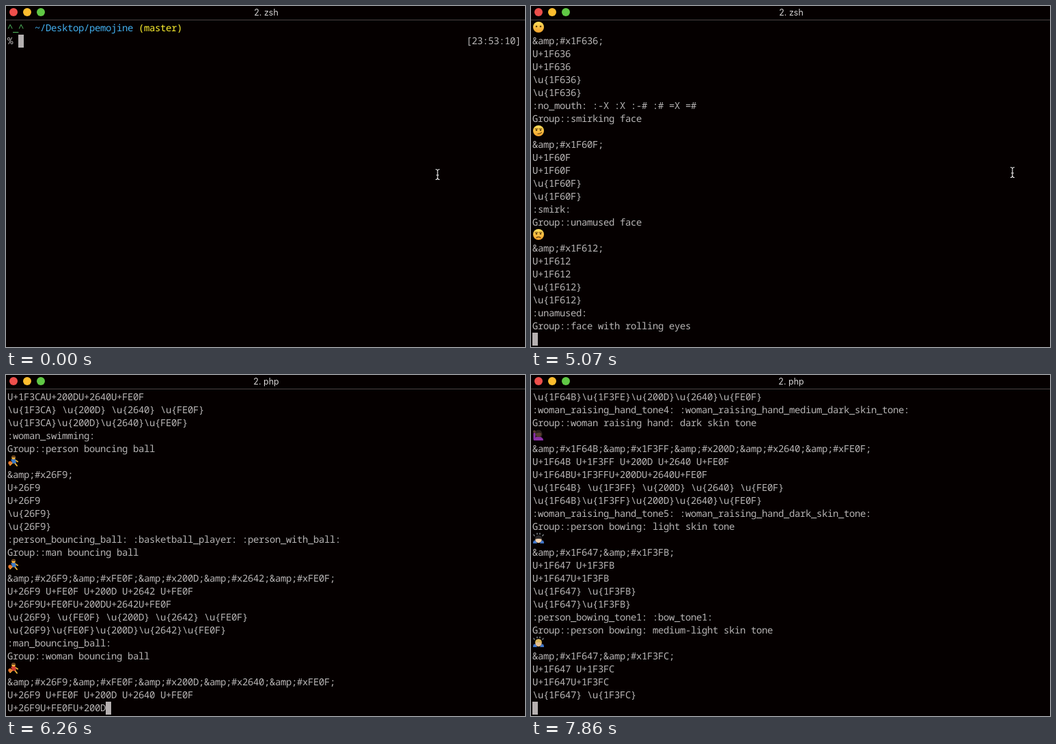
An HTML page that plays this animation: 760 px wide and 500 px high, repeating every 8000 ms.

```html
<!DOCTYPE html>
<html lang="en">
<head>
<meta charset="utf-8">
<title>Terminal</title>
<style>
html, body { margin: 0; width: 100%; height: 100%; overflow: hidden; background: #050000; }
svg { display: block; width: 760px; height: 500px; }
.mono { font: 500 14px "Noto Sans Mono", monospace; letter-spacing: -.4px; white-space: pre; text-rendering: geometricPrecision; }
.title { font: 400 12.5px Inter, sans-serif; text-anchor: middle; }
</style>
</head>
<body>
<svg viewBox="0 0 760 500" xmlns="http://www.w3.org/2000/svg">
  <defs>
    <linearGradient id="skin" x2="0" y2="1">
      <stop offset="0" stop-color="#ffe05c"/><stop offset="1" stop-color="#f3a02c"/>
    </linearGradient>
    <clipPath id="wave"><path d="M-8 -4Q-5 -6 -1 -4.5T8 -6V4Q4 6 0 4.5T-8 6Z"/></clipPath>
  </defs>
  <rect width="760" height="500" fill="#050000"/>
  <rect y="20" width="760" height="1" fill="#484444"/>
  <circle cx="11" cy="9" r="6" fill="#ee4f4b"/>
  <circle cx="31" cy="9" r="6" fill="#fdbd2e"/>
  <circle cx="51" cy="9" r="6" fill="#60c845"/>
  <text id="title" class="title" x="381" y="14" fill="#d2d0d0"></text>
  <g id="rows" class="mono" fill="#b8b5b5"></g>
  <g id="art"></g>
  <rect id="caret" width="8" height="19" fill="#b5b0b0"/>
  <path id="beam" d="M-3 -7.5Q0 -7.5 0 -5V5Q0 7.5 -3 7.5M3 -7.5Q0 -7.5 0 -5M0 5Q0 7.5 3 7.5M-2 1H2" fill="none" stroke="#e6e4e4" stroke-width="1.2"/>
</svg>
<script>
const LOOP = 8000, ROWS = 25, LINE = 19, COL = 8, LEFT = 2, TOP = 23;
const $ = id => document.getElementById(id);
const hex = n => n.toString(16).toUpperCase();

// Small pictures, each drawn around 0,0 in a box of about 16 px
const shape = (d, fill) => `<path d="${d}" fill="${fill}"/>`;
const disc = (fill, r = 7, x = 0, y = 0) => `<circle cx="${x}" cy="${y}" r="${r}" fill="${fill}"/>`;
const line = (d, color = '#60400f', w = 1.2) =>
  `<path d="${d}" fill="none" stroke="${color}" stroke-width="${w}" stroke-linecap="round"/>`;
const SKIN = 'url(#skin)', BROWN = '#6a4420', DARK = '#25222a';

const face = (mouth, brows = '') => disc(SKIN, 8) + disc('#60400f', 1.3, -3, -1) +
  disc('#60400f', 1.3, 3, -1) + line(mouth) + line(brows);
const cat = mouth => shape('M-7 -1L-6.5 -8L-1 -6ZM7 -1L6.5 -8L1 -6Z', '#f3a02c') + face(mouth);

function person({ skin = SKIN, hair = BROWN, cloth = '#4b8fd0', hat, long, extra = '' }) {
  return (long ? `<ellipse cy="-1" rx="5.6" ry="6" fill="${hair}"/>` : '') +
    shape('M-7 8Q-7 2.5 0 2.5T7 8Z', cloth) + disc(skin, 4.3, 0, -1.5) +
    shape('M-4.8 -2Q-5 -7.5 0 -7.5T4.8 -2Q2 -5 -4.8 -2Z', hair) +
    (hat ? shape('M-7 -4Q-5 -9 1 -8Q7 -8 6.5 -4Z', hat) : '') + extra;
}
const artist = long => person({ long, hat: DARK, cloth: '#d9d9dc',
  extra: line('M4 6L7 0', '#b08a4a') + disc('#a87843', 2.4, -5, 6) + shape('M-2 3H2L0 6Z', '#39425c') });
const pilot = person({ hat: '#2b2a30', cloth: '#2b2a30',
  extra: shape('M-2 3H2L0 7Z', '#e8e8e8') + line('M-3 -5H3M-6 6H-4M4 6H6', '#d9a92f') });
const worker = (long, cloth, skin) => person({ long, cloth, skin });
const player = (shirt, hair = BROWN) => line('M0 1L-5 6M1 2L5 7M1 -2L6 1', '#e9b13a', 2) +
  shape('M-4 -2L2 -4L4 3L-1 4Z', shirt) + disc(SKIN, 2.8, 0, -5) +
  shape('M-3 -5Q-2 -9 1 -8T3 -5Z', hair) + disc('#e8792c', 2.7, -5, 3);
const bow = (skin, hair) => shape('M-8 7Q-8 1 -4 3L-2 7ZM8 7Q8 1 4 3L2 7Z', '#3f74c8') +
  disc(skin, 4.7, 0, 1.5) + shape('M-5 1Q-5 -5 0 -5T5 1Q0 -1 -5 1Z', hair) +
  line('M-6 -4L-7 -6M-2 -6.5V-8M2 -6.5V-8M6 -4L7 -6', '#c9d4dc', 1);
const raise = (skin, hair) => person({ skin, hair, cloth: '#8b31a5', long: true,
  extra: line('M-6 6V-2', '#8b31a5', 3) + disc(skin, 2, -6, -5) });
const family = kids => disc(SKIN, 3, -4, -4) + disc(SKIN, 3, 4, -4) +
  shape('M-8 7V1Q-4 -3 0 1V7Z', '#4b8fd0') + shape('M0 7V1Q4 -3 8 1V7Z', '#c94f74') +
  disc(SKIN, 2.5, 0, 3) + shape('M-3 8Q0 4 3 8Z', kids);
const beast = color => shape('M-7 0L-6 -8L0 -4L6 -8L7 0Z', color) + disc(color, 6.5, 0, 1) +
  disc(DARK, 1, -2.5, 0) + disc(DARK, 1, 2.5, 0) + disc(DARK, 1.4, 0, 3.5);
const fruit = color => disc(color, 6.3, 0, 1.5) + line('M0 -4Q1 -7 4 -7', '#5a9a3a', 1.6);
const bus = color => shape('M-8 -5H8V5H-8Z', color) + shape('M-6 -3H6V0H-6Z', '#cfe6f2') +
  disc('#333', 2, -4, 5) + disc('#333', 2, 4, 5);
const folder = color => shape('M-8 -5H-2L0 -3H8V6H-8Z', color);

const wave = inner => `<g clip-path="url(#wave)">${inner}</g>`;
const bands = (colors, extra = '') => wave(colors.map((c, i) => {
  const h = 12 / colors.length;
  return `<rect x="-8" y="${-6 + i * h}" width="16" height="${h}" fill="${c}"/>`;
}).join('') + extra);

// Entries: [name, code points, short names, picture]
const TONES = ['light', 'medium-light', 'medium', 'medium-dark', 'dark'];
const TINTS = ['#f4d3b2', '#e3bd90', '#c18e61', '#996440', '#5a3e30'];
const item = (name, codes, shorts, art) => [name, codes.split(' '), shorts.split(' '), art];

const sexed = (sex, job, code, art) =>
  item(`${sex} ${job}`, `1F46${sex == 'man' ? 8 : 9} 200D ${code}`, `${sex}_${job.replace(' ', '_')}`, art);
const gender = (sex, act, code, art) =>
  item(`${sex} ${act}`, `${code} 200D ${sex == 'man' ? 2642 : 2640} FE0F`, `${sex}_${act.replace(' ', '_')}`, art);
const flag = (cc, name, art) => item(`flag: ${name}`,
  [...cc].map(c => hex(0x1F1E6 + c.charCodeAt(0) - 65)).join(' '),
  `flag_${cc.toLowerCase()} ${cc.toLowerCase()}`, art);
// "*" stands for the tone's code, "#" for its number, "@" for its name
const tone = (n, name, codes, shorts, art) => item(`${name}: ${TONES[n]} skin tone`,
  codes.replace('*', hex(0x1F3FB + n)),
  shorts.replace(/#/g, n + 1).replace(/@/g, TONES[n].replace('-', '_')), art(TINTS[n]));

const mechanic = n => tone(n, 'man mechanic', '1F468 * 200D 1F527',
  'man_mechanic_tone# man_mechanic_@_skin_tone', s => worker(false, '#3b5f8f', s));
const man = n => tone(n, 'man', '1F468 *', 'man_tone#', s => worker(false, '#4b8fd0', s));
const woman = n => tone(n, 'woman raising hand', '1F64B * 200D 2640 FE0F',
  'woman_raising_hand_tone# woman_raising_hand_@_skin_tone', s => raise(s, '#2a211e'));
const bowing = n => tone(n, 'person bowing', '1F647 *', 'person_bowing_tone# bow_tone#',
  s => bow(s, n ? '#d8b45a' : '#2a2728'));

const SAD = 'M-3.5 5Q0 1 3.5 5', SMILE = 'M-4 3Q0 7 4 3', FLAT = 'M-5 -3H-1M1 -3H5';

// Output: [time, hidden lines of the first entry, entries, part of the last row]
const output = [
  [5070, 1, [
    item('face without mouth', '1F636', 'no_mouth :-X :X :-# :# =X =#', face('')),
    item('smirking face', '1F60F', 'smirk', face('M-1 4.5Q3 4.5 4.5 2.5', FLAT)),
    item('unamused face', '1F612', 'unamused', face('M-3 4.8Q0 2.5 3 4.8', FLAT)),
    item('face with rolling eyes', '1F644', 'rolling_eyes', face(SAD))]],
  [5220, 3, [
    item('loudly crying face', '1F62D', 'sob', face(SAD)),
    item('frowning face with open mouth', '1F626', 'frowning', face(SAD)),
    item('anguished face', '1F627', 'anguished', face(SAD, FLAT)),
    item('fearful face', '1F628', 'fearful', face(SAD))]],
  [5370, 5, [
    item('grinning cat face with smiling eyes', '1F638', 'smile_cat', cat(SMILE)),
    item('cat face with tears of joy', '1F639', 'joy_cat', cat(SMILE)),
    item('smiling cat face with heart-eyes', '1F63B', 'heart_eyes_cat', cat(SMILE)),
    item('cat face with wry smile', '1F63C', 'smirk_cat', cat('M-1 4Q3 4 4 2'))]],
  [5520, 2, [
    sexed('man', 'cook', '1F373', worker(false, '#e6e6e6')),
    sexed('woman', 'cook', '1F373', worker(true, '#e6e6e6')),
    sexed('man', 'mechanic', '1F527', worker(false, '#3b5f8f')),
    sexed('woman', 'mechanic', '1F527', worker(true, '#3b5f8f'))]],
  [5670, 4, [
    sexed('woman', 'singer', '1F3A4', worker(true, '#7b3fa0')),
    sexed('man', 'artist', '1F3A8', artist(false)),
    sexed('woman', 'artist', '1F3A8', artist(true)),
    sexed('man', 'pilot', '2708 FE0F', pilot)]],
  [5820, 6, [
    gender('man', 'wearing turban', '1F473', person({ hat: '#d8d8d8' })),
    gender('woman', 'wearing turban', '1F473', person({ hat: '#d8d8d8', long: true })),
    item('woman with headscarf', '1F9D5', 'woman_with_headscarf', person({ hair: '#8a5cc0', long: true })),
    item('bearded person', '1F9D4', 'bearded_person', worker(false, '#4b8fd0'))]],
  [5970, 3, [
    gender('man', 'facepalming', '1F926', worker(false, '#4b8fd0')),
    gender('woman', 'facepalming', '1F926', worker(true, '#8b31a5')),
    item('person shrugging', '1F937', 'person_shrugging shrug', worker(true, '#8b31a5')),
    gender('man', 'shrugging', '1F937', worker(false, '#4b8fd0'))]],
  [6110, 5, [
    item('person golfing', '1F3CC', 'person_golfing golfer', player('#4b8fd0')),
    gender('man', 'golfing', '1F3CC FE0F', player('#4b8fd0')),
    gender('woman', 'golfing', '1F3CC FE0F', player('#c94f74')),
    item('person surfing', '1F3C4', 'person_surfing surfer', player('#3fa7b5'))]],
  [6260, 4, [
    gender('woman', 'swimming', '1F3CA', player('#4b8fd0')),
    item('person bouncing ball', '26F9', 'person_bouncing_ball basketball_player person_with_ball', player('#3b78c4')),
    gender('man', 'bouncing ball', '26F9 FE0F', player('#3b78c4')),
    gender('woman', 'bouncing ball', '26F9 FE0F', player('#d13c32'))], 18],
  [6380, 2, [
    item('family: man, woman, boy', '1F468 200D 1F469 200D 1F466', 'family_man_woman_boy', family('#5fae4e')),
    item('family: man, woman, girl', '1F468 200D 1F469 200D 1F467', 'family_mwg family_man_woman_girl', family('#d66aa0')),
    item('family: man, man, boy', '1F468 200D 1F468 200D 1F466', 'family_mmb family_man_man_boy', family('#5fae4e')),
    item('family: man, man, girl', '1F468 200D 1F468 200D 1F467', 'family_mmg family_man_man_girl', family('#d66aa0'))]],
  [6530, 5, [
    item('dog face', '1F436', 'dog', beast('#c89a66')),
    item('wolf face', '1F43A', 'wolf', beast('#8f979d')),
    item('fox face', '1F98A', 'fox fox_face', beast('#e8792c')),
    item('cat face', '1F431', 'cat', beast('#f0b84a'))]],
  [6680, 3, [
    item('green apple', '1F34F', 'green_apple', fruit('#86c440')),
    item('pear', '1F350', 'pear', fruit('#b9cc46')),
    item('peach', '1F351', 'peach', fruit('#f39a6b')),
    item('cherries', '1F352', 'cherries', fruit('#c9283a'))]],
  [6820, 6, [
    item('bus', '1F68C', 'bus', bus('#d9d9d9')),
    item('oncoming bus', '1F68D', 'oncoming_bus', bus('#4b8fd0')),
    item('trolleybus', '1F68E', 'trolleybus', bus('#5fae4e')),
    item('minibus', '1F690', 'minibus', bus('#c9ced2'))]],
  [6970, 4, [
    item('file folder', '1F4C1', 'file_folder', folder('#67b8e3')),
    item('open file folder', '1F4C2', 'open_file_folder', folder('#7fc6ea')),
    item('card index dividers', '1F5C2', 'card_index_dividers dividers', folder('#d8b45a')),
    item('calendar', '1F4C5', 'date', folder('#e6e6e6'))]],
  [7120, 2, [
    flag('CY', 'Cyprus', bands(['#eee'], disc('#d98a2c', 2.5))),
    flag('CZ', 'Czechia', bands(['#eee', '#d7202f'], shape('M-8 -7L0 0L-8 7Z', '#23508e'))),
    flag('DE', 'Germany', bands(['#222', '#d7202f', '#f6c52f'])),
    flag('DJ', 'Djibouti', bands(['#6ab2e7', '#2cae4b'], shape('M-8 -7L0 0L-8 7Z', '#eee')))]],
  [7270, 6, [
    flag('MZ', 'Mozambique', bands(['#2b9b4e', '#222', '#f4d03a'])),
    flag('NA', 'Namibia', wave(shape('M-8 -8H8L-8 6Z', '#2450a4') + shape('M8 8H-8L8 -6Z', '#2f9a4c') +
      line('M-9 7L9 -7', '#eee', 5.5) + line('M-9 7L9 -7', '#d1303d', 3.8) + disc('#f5d33c', 1.8, -4, -2.5))),
    flag('NC', 'New Caledonia', bands(['#2450b8', '#dc3038', '#2f9a4c'], disc('#f7d33b', 3.6, -2) + line('M-2 -2V2', '#222', 1))),
    flag('NE', 'Niger', bands(['#e56a35', '#f0eeea', '#3aa64c'], disc('#e56a35', 1.8)))]],
  [7410, 3, [
    flag('ZA', 'South Africa', bands(['#d1303d', '#2f9a4c', '#2450a4'], shape('M-8 -5L-2 0L-8 5Z', '#222'))),
    flag('ZM', 'Zambia', bands(['#2f9a4c'], shape('M3 0H8V7H3Z', '#e8792c'))),
    flag('ZW', 'Zimbabwe', bands(['#2f9a4c', '#f4d03a', '#d1303d', '#222', '#d1303d', '#f4d03a', '#2f9a4c'])),
    tone(0, 'boy', '1F466 *', 'boy_tone#', s => worker(false, '#4b8fd0', s))]],
  [7560, 5, [man(0), man(1), man(2), man(3)]],
  [7710, 2, [mechanic(0), mechanic(1), mechanic(2), mechanic(3)]],
  [7860, 6, [woman(3), woman(4), bowing(0), bowing(1)]]
];

const typed = [[0, ''], [1930, 'p'], [2080, 'ph'], [2230, 'php'], [2530, 'php '], [2820, 'php e'],
  [2970, 'php example/'], [3870, 'php example/gr'], [4170, 'php example/groups.php ']];
const beamAt = [[0, 632, 247], [440, 688, 245], [590, 705, 244]];
const ENTER = 4770, PHP = 5220;

const latest = (steps, t) => steps.reduce((hit, s) => s[0] <= t ? s : hit, null);

// The eight lines printed for one entry; the picture line is an object
function block([name, codes, shorts, art]) {
  const join = (f, gap) => codes.map(f).join(gap);
  const plus = c => `U+${c}`, esc = c => `\\u{${c}}`;
  return [`Group::${name}`, { art }, join(c => `&amp;#x${c};`, ''), join(plus, ' '), join(plus, ''),
    join(esc, ' '), join(esc, ''), shorts.map(s => /^[:=]/.test(s) ? s : `:${s}:`).join(' ')];
}

const rows = Array.from({ length: ROWS }, (_, i) => {
  const el = document.createElementNS('http://www.w3.org/2000/svg', 'text');
  el.setAttribute('x', LEFT);
  el.setAttribute('y', TOP + 14 + i * LINE);
  return $('rows').appendChild(el);
});

function caret(col, row) {
  $('caret').setAttribute('x', LEFT + col * COL);
  $('caret').setAttribute('y', TOP + row * LINE);
}

function prompt(t) {
  const span = (col, color, text) => `<tspan x="${LEFT + col * COL}" fill="${color}">${text}</tspan>`;
  const cmd = latest(typed, t)[1];
  rows.forEach(r => r.textContent = '');
  rows[0].innerHTML = span(0, '#4fb35c', '^_^') + span(5, '#43b0f0', '~/Desktop/pemojine') + span(24, '#fdf02f', '(master)');
  rows[1].innerHTML = span(0, '#b8b5b5', '% ' + cmd) + span(84, '#b8b5b5', '[23:53:10]');
  $('art').innerHTML = '';
  if (t < ENTER) caret(2 + cmd.length, 1);
  else caret(0, 2);
}

function listing([, skip, items, part = 0]) {
  const lines = items.flatMap(block).slice(skip, skip + ROWS);
  const last = lines.pop();
  lines.push(part ? last.slice(0, part) : '');
  let art = '';
  rows.forEach((r, i) => {
    const l = lines[i];
    r.textContent = l.art ? '' : l;
    if (l.art) art += `<g transform="translate(11 ${TOP + 8 + i * LINE})">${l.art}</g>`;
  });
  $('art').innerHTML = art;
  caret(part, ROWS - 1);
}

let shown = '';
function draw(now) {
  const t = now % LOOP, out = latest(output, t), [, x, y] = latest(beamAt, t);
  const key = [out ? out[0] : latest(typed, t)[0], t >= ENTER, x].join();
  if (key === shown) return;
  shown = key;
  if (out) listing(out);
  else prompt(t);
  $('title').textContent = t < PHP ? '2. zsh' : '2. php';
  $('beam').setAttribute('transform', `translate(${x} ${y})`);
  $('beam').setAttribute('visibility', t < PHP ? 'visible' : 'hidden');
}
function tick() {
  draw(performance.now());
  requestAnimationFrame(tick);
}
tick();
</script>
</body>
</html>
```
